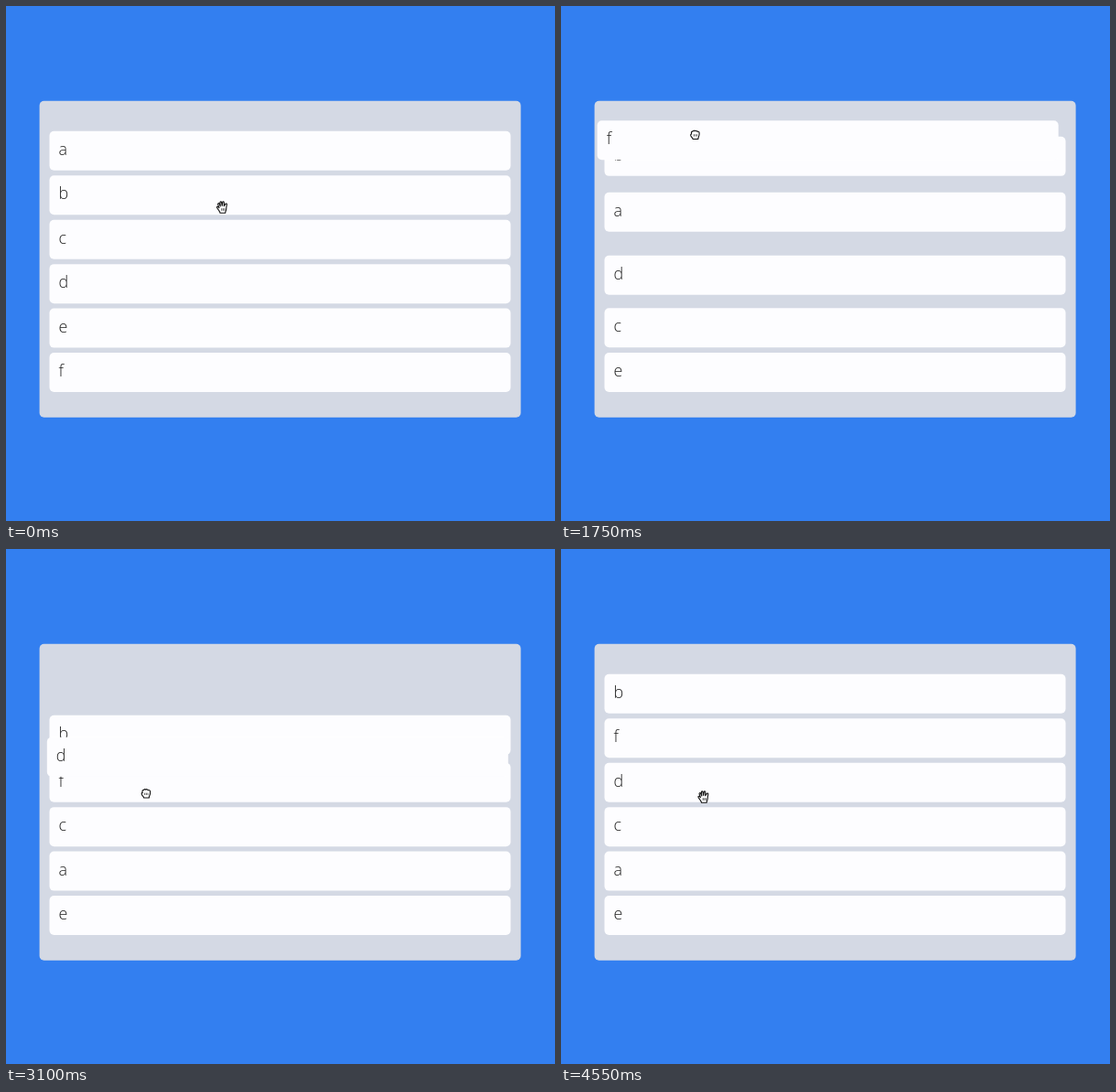
An HTML page that plays this animation: 600 by 563 pixels, repeating every 4900 ms.

```html
<!DOCTYPE html>
<html lang="en">
<head>
<meta charset="utf-8">
<title>Sortable list</title>
<style>
  html, body { margin: 0; width: 100%; height: 100%; overflow: hidden; background: #337ff0; }
  .panel {
    position: absolute; left: 0; top: 0; width: 526px; height: 346px;
    transform: translate(36.6px, 103.7px); border-radius: 5px; background: #d4d9e4;
  }
  .row {
    position: absolute; left: 0; top: 0; width: 504px; height: 43px; box-sizing: border-box;
    padding-left: 10px; border-radius: 5px; background: #fdfdff; color: #222;
    font: 300 18px/39px "Open Sans", "Noto Sans", sans-serif;
  }
  #cursor { position: absolute; left: 0; top: 0; z-index: 9; overflow: visible; }
  #cursor path { fill: #fff; stroke: #111; stroke-width: 1.1; stroke-linejoin: round; }
  #cursor .lines { fill: none; stroke-width: .7; }
</style>
</head>
<body>
<div class="panel"></div>
<svg id="cursor" width="13" height="14">
  <g id="open">
    <path d="M4.3 13.3C4.3 12 3.4 11.2 2.6 10 1.9 9 .6 7.6 .7 6.9 .9 6 2 6.1 2.7 7L3.3 7.6 1.9 3.9C1.6 2.6 2.9 2.2 3.4 3.3L4.6 6 4.2 1.9C4.2 .6 5.7 .6 5.9 1.8L6.5 5.5 7 1.6C7.2 .5 8.6 .5 8.6 1.8L8.6 5.8 10.1 3.4C10.8 2.5 12 3.1 11.6 4.3L11.2 6.6C11 9 11.2 9.4 10.6 10.7 10.2 11.6 10 12.2 10 13.3Z"/>
    <path class="lines" d="M6 8.2V10.8M7.6 8.2V10.8M9.2 8.2V10.8"/>
  </g>
  <g id="closed">
    <path d="M4.2 11.9C4.2 10.8 3.2 10.2 2.3 9 1.5 7.9 1.5 6.3 2.7 6.3 2.3 4.3 2.6 3.3 4 3.5 4.5 2.3 5.7 2.2 6.3 3.1 7.1 2.2 8.3 2.5 8.7 3.6 10.2 3.1 11.2 3.9 11.2 5.4 11.3 8 10.8 8.8 10.3 9.8 10 10.5 9.9 11 9.9 11.9Z"/>
    <path class="lines" d="M5.2 6.6V8.8M6.9 6.6V8.8M8.6 6.6V8.8"/>
  </g>
</svg>
<script>
const LOOP = 4900, STEP = 50;
const SHIFT = 160, SETTLE = 200, LAG = 20;
const LEFT = 47.5, TOP = 136.8, PITCH = 48.45;
const names = [...'abcdef'];
const slotY = slot => TOP + PITCH * slot;

// The turning points of each drag as [time, x, y]; grip is where the hand holds the row.
const drags = [
  { row: 'a', grip: [104, 37], path: [[200, LEFT, slotY(0)], [600, 50, 213]] },
  { row: 'c', grip: [100, 33], path: [[950, LEFT, slotY(2)], [1300, 44, 302]] },
  { row: 'f', grip: [107, 28], path: [[1500, LEFT, slotY(5)], [1800, 39, 105], [2000, 48, 200]] },
  { row: 'a', grip: [115, 18], path: [[2400, LEFT, slotY(2)], [2600, 58, 405], [2720, 54, 345]] },
  { row: 'd', grip: [107, 36], release: 4550, path: [
    [2800, LEFT, slotY(2)], [2970, 41, 105], [3280, 51, 370], [3580, 50, 182],
    [3750, 50, 173], [3880, 48.5, 240], [4150, 48.5, 235]] }
];
for (const drag of drags) {
  drag.start = drag.path[0][0];
  drag.drop = drag.path[drag.path.length - 1][0];
}

const pointer = [[30, 236, 220], ...drags.flatMap(({ grip, path }) =>
  path.map(([time, x, y]) => [time, x + grip[0], y + grip[1]]))];

const clamp = (value, low, high) => Math.min(high, Math.max(low, value));
const mix = (a, b, k) => a + (b - a) * k;
const ease = k => {
  k = clamp(k, 0, 1);
  return k < .5 ? 2 * k * k : 1 - 2 * (1 - k) ** 2;
};

// Smooth curve through the points that never overshoots them.
function sample(points, axis, time) {
  const last = points.length - 1;
  time = clamp(time, points[0][0], points[last][0]);
  if (time === points[last][0]) return points[last][axis];
  const i = points.findIndex(p => p[0] > time) - 1;
  const slope = j => (points[j + 1][axis] - points[j][axis]) / (points[j + 1][0] - points[j][0]);
  const tangent = j => {
    if (j === 0 || j === last) return 0;
    const before = slope(j - 1), after = slope(j);
    return before * after <= 0 ? 0 : 2 * before * after / (before + after);
  };
  const span = points[i + 1][0] - points[i][0];
  const k = (time - points[i][0]) / span;
  const bend = k * (1 - k) * span * ((1 - k) * tangent(i) - k * tangent(i + 1));
  return mix(points[i][axis], points[i + 1][axis], k * k * (3 - 2 * k)) + bend;
}

// Follow every drag once and note when each row is pushed to another slot.
function findShifts() {
  const shifts = Object.fromEntries(names.map((name, slot) => [name, [[0, slot]]]));
  let order = names;
  for (const { row, path, start, drop } of drags) {
    for (let time = start; time <= drop; time += 10) {
      const slot = clamp(Math.round((sample(path, 2, time) - TOP) / PITCH - .1), 0, names.length - 1);
      if (order[slot] === row) continue;
      const next = order.filter(name => name !== row);
      next.splice(slot, 0, row);
      next.forEach((name, i) => { if (order[i] !== name) shifts[name].push([time, i]); });
      order = next;
    }
  }
  return shifts;
}
const shifts = findShifts();

function rowPosition(name, time) {
  let x = LEFT, y = slotY(shifts[name][0][1]), lifted = false;
  for (const [start, slot] of shifts[name].slice(1))
    y = mix(y, slotY(slot), ease((time - start) / SHIFT));
  for (const { row, path, start, drop } of drags) {
    if (row !== name || time < start || time >= drop + SETTLE) continue;
    const settle = ease((time - drop) / SETTLE);
    x = mix(sample(path, 1, time), x, settle);
    y = mix(sample(path, 2, time), y, settle);
    lifted = true;
  }
  return { x, y, lifted };
}

const place = (node, x, y) => { node.style.transform = `translate(${x}px, ${y}px)`; };
const [cursor, openHand, closedHand] =
  ['cursor', 'open', 'closed'].map(id => document.getElementById(id));

const rows = names.map(name => {
  const node = document.createElement('div');
  node.className = 'row';
  node.textContent = name;
  document.body.append(node);
  return { name, node };
});

function draw(now) {
  const time = Math.floor(now % LOOP / STEP) * STEP;
  for (const { name, node } of rows) {
    const { x, y, lifted } = rowPosition(name, time);
    place(node, x, y);
    node.style.zIndex = lifted ? 2 : 1;
  }
  const holding = drags.some(({ start, drop, release = drop }) => time >= start && time < release);
  place(cursor, sample(pointer, 1, time + LAG) - 6.3, sample(pointer, 2, time + LAG) - 7);
  openHand.style.display = holding ? 'none' : '';
  closedHand.style.display = holding ? '' : 'none';
}

const begin = performance.now();
function tick() {
  draw(performance.now() - begin);
  requestAnimationFrame(tick);
}
tick();
</script>
</body>
</html>
```
